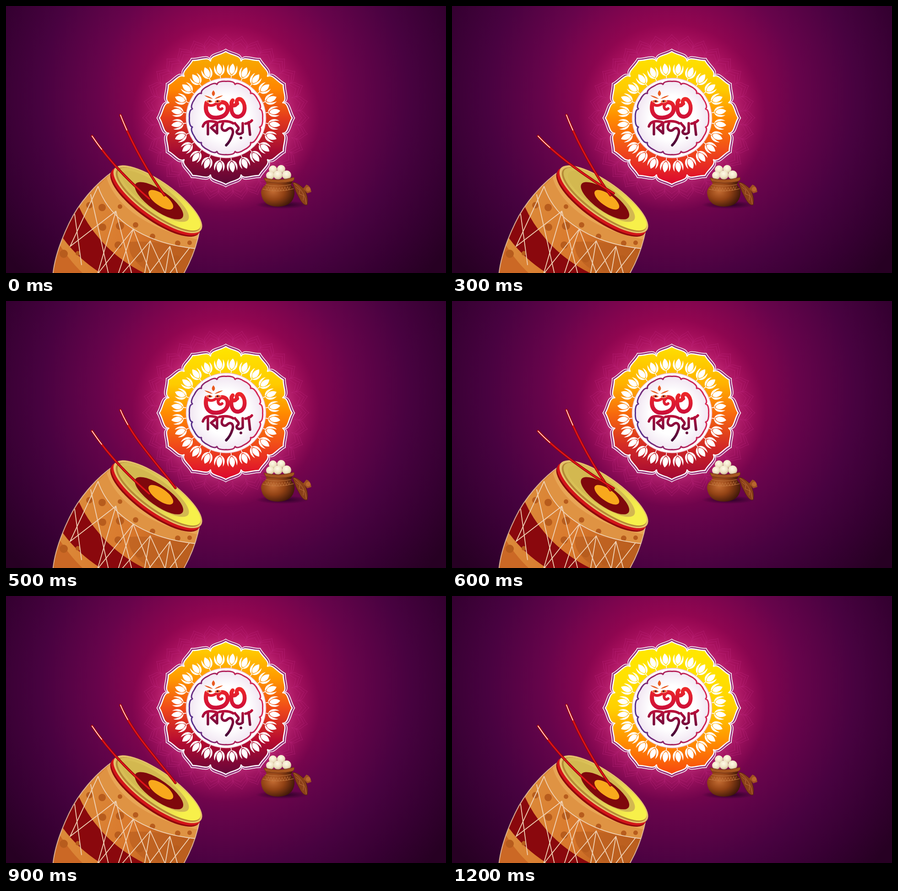
Write an HTML page that moves like this. It is 961x583 px and loops after 1.3 s.

```html
<!DOCTYPE html>
<html lang="bn">
<head>
<meta charset="utf-8">
<title>শুভ বিজয়া</title>
<style>
html, body { margin: 0; width: 100%; height: 100%; overflow: hidden; background: #3a0041; }
svg { display: block; width: 961px; height: 583px; }
.line { fill: none; stroke-linecap: round; stroke-linejoin: round; }
</style>
</head>
<body>
<svg viewBox="0 0 961 583">
<defs>
  <radialGradient id="back" gradientUnits="userSpaceOnUse" cx="478" cy="195" r="590">
    <stop offset="0" stop-color="#b60758"/><stop offset=".25" stop-color="#950651"/>
    <stop offset=".47" stop-color="#67044b"/><stop offset=".68" stop-color="#480240"/>
    <stop offset=".86" stop-color="#350031"/><stop offset="1" stop-color="#270023"/>
  </radialGradient>
  <radialGradient id="glow">
    <stop offset=".6" stop-color="#e04c98" stop-opacity=".7"/>
    <stop offset=".78" stop-color="#c92a7a" stop-opacity=".38"/>
    <stop offset="1" stop-color="#b01866" stop-opacity="0"/>
  </radialGradient>
  <linearGradient id="tint" gradientUnits="userSpaceOnUse" x1="0" y1="102" x2="0" y2="387">
    <stop offset="0"/><stop offset=".28"/><stop offset=".5"/><stop offset=".75"/><stop offset="1"/>
  </linearGradient>
  <radialGradient id="disc">
    <stop offset=".6" stop-color="#fff"/><stop offset="1" stop-color="#f1e6f2"/>
  </radialGradient>
  <linearGradient id="ring" x1="0" y1=".6" x2="1" y2=".4">
    <stop offset="0" stop-color="#55338f"/><stop offset=".4" stop-color="#a3225f"/>
    <stop offset="1" stop-color="#d92a55"/>
  </linearGradient>
  <linearGradient id="ink" gradientUnits="userSpaceOnUse" x1="0" y1="198" x2="0" y2="306">
    <stop offset="0" stop-color="#f02a28"/><stop offset=".42" stop-color="#cf1038"/>
    <stop offset=".65" stop-color="#8d0d3d"/><stop offset="1" stop-color="#420a38"/>
  </linearGradient>
  <linearGradient id="skin">
    <stop offset="0" stop-color="#d5b955"/><stop offset=".55" stop-color="#e2cf58"/>
    <stop offset=".85" stop-color="#f7f04a"/>
  </linearGradient>
  <linearGradient id="wood" gradientUnits="userSpaceOnUse" x1="120" y1="470" x2="370" y2="583">
    <stop offset="0" stop-color="#dc8d3c"/><stop offset=".55" stop-color="#d9792d"/>
    <stop offset="1" stop-color="#b95b1b"/>
  </linearGradient>
  <radialGradient id="clay" cx=".36" cy=".42" r=".66">
    <stop offset="0" stop-color="#c46d33"/><stop offset=".5" stop-color="#934315"/>
    <stop offset="1" stop-color="#401809"/>
  </radialGradient>
  <radialGradient id="sweet" cx=".45" cy=".35" r=".65">
    <stop offset="0" stop-color="#fffbe8"/><stop offset=".65" stop-color="#eee2c3"/>
    <stop offset="1" stop-color="#c9b58c"/>
  </radialGradient>
  <radialGradient id="shade">
    <stop offset="0" stop-color="#16001a" stop-opacity=".8"/><stop offset="1" stop-color="#16001a" stop-opacity="0"/>
  </radialGradient>
  <path id="body" d="M235 360C195 388 158 432 138 474Q106 540 102 590H385Q413 542 422 494Z"/>
  <clipPath id="hull"><use href="#body"/></clipPath>
  <g id="bud">
    <path d="M0-120C-8-112-8-101 0-96C8-101 8-112 0-120Z"/>
    <path id="leaf" d="M-9-117C-14-108-12-95 0-93C-5-98-9-106-9-117Z"/>
    <use href="#leaf" transform="scale(-1 1)"/>
    <path d="M0-95V-87" stroke="#fff" stroke-width="1.6"/>
  </g>
</defs>

<rect width="961" height="583" fill="url(#back)"/>
<circle cx="480" cy="244" r="205" fill="url(#glow)"/>
<g id="lace" class="line" stroke="#c22a85" stroke-width="1" opacity=".45" transform="translate(480 244)"></g>

<path id="rim" fill="#96307a" stroke="#fff" stroke-width="1.5"/>
<path id="petals" fill="url(#tint)" stroke="#fff" stroke-width="2.5"/>
<g id="buds" fill="#fff"></g>

<circle cx="480.5" cy="244.5" r="87" fill="#fff" stroke="#efbfd0" stroke-width="1.5"/>
<path id="scallop" fill="url(#disc)" stroke="url(#ring)" stroke-width="3"/>

<g class="line" stroke="url(#ink)">
  <path stroke-width="9" d="M438 211C432 236 446 245 460 244C479 243 486 231 484 220C482 209 468 207 464 215"/>
  <path stroke-width="6" d="M438 212C443 219 452 219 460 212M464 215C461 223 467 229 472 224"/>
  <path stroke-width="8.5" d="M495 206C487 215 499 222 504 213M493 212C489 235 499 244 510 241C525 236 524 212 513 204C506 201 502 207 505 213"/>
  <path stroke-width="5.5" d="M430 263C433 252 445 248 462 255L448 266L461 278V256M441 256V280M530 254L533 281"/>
  <path stroke-width="5.5" d="M466 253Q484 249 496 256M474 256C466 269 477 277 484 269C491 262 499 270 494 282Q490 295 481 304"/>
  <path stroke-width="5.5" d="M500 256C505 263 512 266 505 272C500 278 511 283 517 276V256M523 257Q533 255 537 250"/>
</g>
<circle cx="513" cy="288" r="3" fill="#650b3b"/>
<g fill="#e95a20">
  <path d="M453 184Q460 192 453 197Q446 192 453 184Z"/>
  <g id="eye">
    <path d="M433 195Q443 196 452 203Q440 201 433 195Z"/>
    <path d="M437 208Q444 201 452 209Q444 214 437 208Z" stroke="#fff" stroke-width=".8"/>
    <circle cx="445" cy="208" r="2" fill="#4a0a30"/>
  </g>
  <use href="#eye" transform="matrix(-1 0 0 1 907 0)"/>
</g>

<ellipse cx="603" cy="434" rx="58" ry="9" fill="url(#shade)"/>
<g id="sweets" fill="url(#sweet)"></g>
<path d="M567 379Q594 386 625 379Q626 386 622 390Q632 399 630 411Q626 438 594 438Q560 438 557 408Q557 397 569 389Z" fill="url(#clay)"/>
<path d="M563 375Q595 384 629 374Q631 381 624 383Q594 390 567 383Z" fill="#a4541f" stroke="#6c3014"/>
<path class="line" d="M561 400Q594 409 628 399M567 390Q594 396 622 390" stroke="#c47a42"/>
<path id="carving" class="line" stroke="#c47a42" opacity=".8"/>
<path d="M626 386Q632 382 651 399Q661 416 658 434Q651 437 643 424Q632 406 626 386Z" fill="#8a3f18" stroke="#55220d"/>
<path class="line" d="M630 387Q653 405 656 432M634 396L642 402L640 410L650 414L649 424" stroke="#bd713b"/>
<path d="M649 399L656 390Q665 392 667 406L658 409Z" fill="#9d4e20"/>
<circle cx="660" cy="400" r="5" fill="#b9652e"/>

<g clip-path="url(#hull)">
  <use href="#body" fill="url(#wood)"/>
  <path d="M270 515Q350 510 410 540L380 590H330Q260 555 270 515Z" fill="#bd6020" opacity=".75"/>
  <path d="M110 510Q140 560 175 590H90Z" fill="#cb6825"/>
  <path d="M157 434Q205 540 316 590H218Q157 554 121 502Z" fill="#8a080d"/>
  <path d="M235 358L201 394C225 465 300 519 418 530L428 490Z" fill="#df9343"/>
  <path d="M235 358L220 376C240 436 310 490 421 510L428 490Z" fill="#e8a656"/>
  <g id="dots" fill="#b75c1d"></g>
  <g class="line" stroke="#efd2b5" stroke-width="1.8">
    <path d="M201 394C225 465 300 519 418 530"/>
    <path d="M201 394L140 525L240 448L200 585L278 487L240 600L315 513L300 600L358 525L345 600L400 529"/>
    <path d="M150 455L165 565M185 412L225 590M240 448L276 590M278 487L318 590M315 513L350 590M358 525L376 590"/>
  </g>
</g>
<use href="#body" fill="none" stroke="#e6c4a4" stroke-width="2" opacity=".85"/>
<g transform="rotate(35.5) translate(515 151)">
  <ellipse cx="-1" cy="9" rx="117" ry="39" fill="#8e070b"/>
  <ellipse cx="-1" cy="6" rx="117" ry="38" fill="#d31419"/>
  <ellipse rx="116" ry="38" fill="#e6c16b"/>
  <ellipse cx="1" cy="0" rx="111" ry="35" fill="#b58a36"/>
  <ellipse cx="2" cy="-2" rx="109" ry="33" fill="url(#skin)"/>
  <ellipse cx="-8" cy="-2" rx="88" ry="27" fill="#d3b850"/>
  <ellipse cx="4" cy="1" rx="63" ry="22" fill="#7f080c"/>
  <ellipse cx="6" cy="-3" rx="32" ry="13" fill="#f8a81c"/>
</g>
<g id="sticks"></g>
</svg>

<script>
const $ = id => document.getElementById(id);
const polar = (r, deg, x, y) => {
  const a = deg * Math.PI / 180;
  return `${(x + r * Math.sin(a)).toFixed(2)} ${(y - r * Math.cos(a)).toFixed(2)}`;
};

// Ring of ogee petals, from radii at the valley, shoulder, flank and tip
function rosette(n, [valley, shoulder, flank, tip], x = 0, y = 0) {
  const step = 360 / n, at = (r, k) => polar(r, k * step, x, y);
  let d = 'M' + at(valley, -.5);
  for (let k = 0; k < n; k++) {
    d += `C${at(shoulder, k - .47)} ${at(flank, k - .18)} ${at(tip, k)}` +
         `C${at(flank, k + .18)} ${at(shoulder, k + .47)} ${at(valley, k + .5)}`;
  }
  return d + 'Z';
}

const repeat = (n, make) => Array.from({ length: n }, (_, i) => make(i)).join('');
const circles = list => list.map(([x, y, r]) => `<circle cx="${x}" cy="${y}" r="${r}"/>`).join('');

$('rim').setAttribute('d', rosette(12, [133, 146, 142, 150.5], 480, 244.5));
$('petals').setAttribute('d', rosette(12, [128, 141, 137, 145], 480, 244.5));
$('scallop').setAttribute('d', rosette(12, [75, 82, 81, 80], 480.5, 244.5));
$('lace').innerHTML = [[160, 173, 172, 182], [156, 167, 166, 175], [150, 160, 159, 166]]
  .map(radii => `<path d="${rosette(32, radii)}"/>`).join('');
$('buds').innerHTML = repeat(24, i =>
  `<use href="#bud" transform="translate(480 244.5) rotate(${7.5 + 15 * i})"/>`);
$('carving').setAttribute('d', repeat(9, i => `M${567 + i * 6} ${394 + 3 * Math.sin(i * .4)}l3 7l3-7`));
$('sweets').innerHTML = circles([
  [583, 357, 9], [601, 356, 9], [577, 370, 9], [613, 369, 10], [594, 369, 10]]);
$('dots').innerHTML = circles([
  [249, 438, 5], [283, 478, 6], [320, 503, 6], [375, 518, 6], [401, 517, 5], [210, 440, 8],
  [211, 483, 8], [249, 480, 9], [182, 435, 7], [245, 522, 8], [126, 541, 9], [157, 540, 5],
  [292, 551, 9], [372, 553, 9], [334, 570, 8]]);

// Petal colours from darkest to brightest; the glow swings up and down them in eight beats
const dusk = ['#f6b000', '#ff8500', '#e43a1c', '#a60c32', '#5c0635'];
const ember = ['#ffd800', '#ff9700', '#f04a19', '#b70b30', '#67063a'];
const noon = ['#fede00', '#ffb100', '#f86b0c', '#d42b25', '#a20734'];
const flame = ['#fee500', '#fecb00', '#ff8b00', '#f04a1a', '#dc082e'];
const sun = ['#ffe900', '#ffe000', '#ffd000', '#ff9100', '#f7480f'];
const palettes = [dusk, ember, noon, flame, sun];

// One letter per beat: left stick up, right stick up, or both down
const strokes = 'DLRLDRLRDRLRD';
const left = { down: 'M188 284Q235 354 313 421', up: 'M188 284C230 329 304 380 353 409' };
const right = { down: 'M250 238C274 300 314 370 346 413', up: 'M250 238C275 298 326 350 370 408' };
const stick = d => `<g class="line"><path d="${d}" stroke="#8e0509" stroke-width="5.5"/>
  <path d="${d}" stroke="#df141a" stroke-width="3"/>
  <path d="${d}" stroke="#fff0e8" stroke-width="1.6" stroke-dasharray="36 999"/></g>`;

const stops = document.querySelectorAll('#tint stop');
let shown = -1;

function draw() {
  const beat = Math.floor(performance.now() % 1300 / 100);
  if (beat !== shown) {
    shown = beat;
    const palette = palettes[4 - Math.abs(4 - beat % 8)];
    stops.forEach((s, i) => s.setAttribute('stop-color', palette[i]));
    $('sticks').innerHTML =
      stick(strokes[beat] === 'R' ? right.up : right.down) +
      stick(strokes[beat] === 'L' ? left.up : left.down);
  }
  requestAnimationFrame(draw);
}
draw();
</script>
</body>
</html>
```
